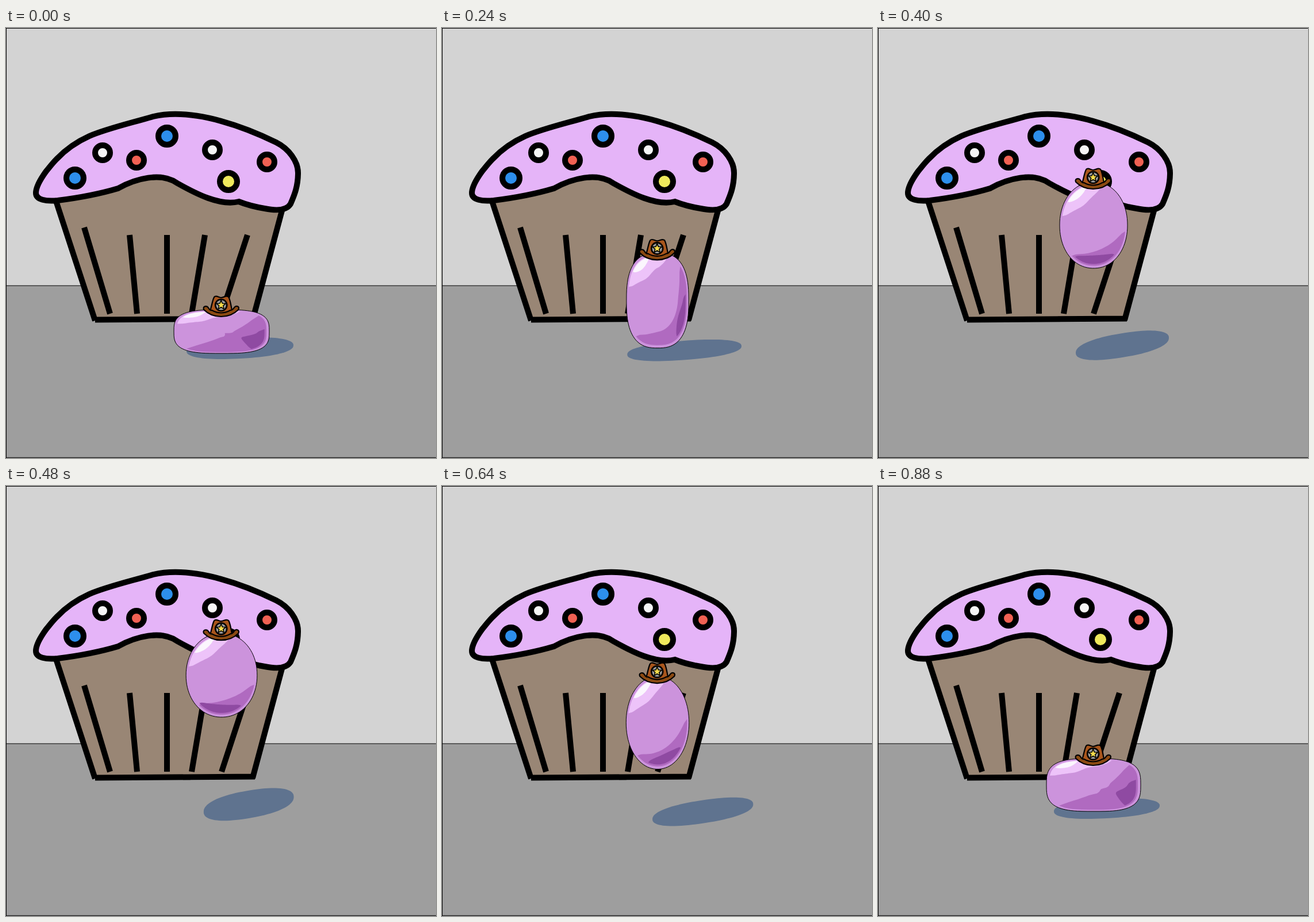
These frames come from a looping animation (748x748 px, 0.96 s). An HTML page:

```html
<!DOCTYPE html>
<html>
<head>
<meta charset="utf-8">
<title>Bouncing jelly bean</title>
<style>
html, body { margin: 0; height: 100%; overflow: hidden; }
svg { display: block; width: 100%; height: 100%; }
</style>
</head>
<body>
<svg viewBox="0 0 748 748">
  <rect width="748" height="748" fill="#d3d3d3"/>
  <rect y="448" width="748" height="300" fill="#9e9e9e"/>
  <path d="M0 .5H748M.5 0V748M0 448.2H748M0 747.3H748" stroke="#000" fill="none"/>

  <g stroke="#000" stroke-width="10" fill="none">
    <path fill="#998675" stroke="none" d="M87 290L156 507L430 505L484 300L300 240Z"/>
    <path d="M86 298L155 509M155 507.5L433 505.5M429 508L480.5 316"/>
    <path d="M136 347L181 497M215 360L228 497M280 360V497M346 360L323 497M420 360L375 497"/>
    <path fill="#e5b4f8" d="M52 287C52 275 62 260 70 249C75 243 81 235 88 228C106 209 125 197 145 188C175 175 215 166 256 154C330 137 425 177 470 199C492 210 508 232 508 252C508 275 502 290 495 306C488 318 470 318 450 314C432 311 415 306 405 302C372 310 330 288 298 270C270 250 225 262 195 279C165 288 130 295 90 300C70 302 52 299 52 287Z"/>
    <g id="sprinkles"></g>
  </g>

  <path id="shadow" fill="#5f738f"/>
  <path id="body" fill="#cc93dc" stroke="#000"/>
  <path id="shade" fill="#b06ac0"/>
  <path id="dark" fill="#8f4aa2"/>
  <path id="light" fill="#edc3f9"/>
  <path id="shine" fill="#fbf6fd"/>

  <g id="hat" stroke="#000" stroke-width="2.2" stroke-linejoin="round">
    <path fill="#a9561c" d="M-19 10C-16 0 -15 -9 -12 -14C-9 -18 -4 -13 0 -13C5 -13 9 -18 13 -14C16 -9 17 0 19 10Q0 19 -19 10Z"/>
    <path fill="#8b4a12" d="M-30 8C-33 2 -25 0 -22 5Q-19 10 -16 9Q0 18 16 9Q20 9 23 4C26 0 33 2 30 8C22 16 12 20 0 20C-12 20 -22 16 -30 8Z"/>
    <circle r="10" fill="#999" stroke-width="2.6"/>
    <path id="star" fill="#f8dc4c" stroke-width="1.6"/>
  </g>
</svg>
<script>
const STEP = 80, STEPS = 12, CENTER = 375, GROUND = 566;
const $ = id => document.getElementById(id);
const draw = (id, points) => $(id).setAttribute('d', 'M' + points.join('L') + 'Z');
const range = (n, f) => Array.from({ length: n }, (_, i) => f(i));

// step, half width, top, bottom, squareness, angle of the shade's tip, shadow x, half width, y, half height
const KEYS = [
  [0, 83, 490, 566, 3.2, -42, 407, 93, 557, 18],
  [2, 64, 448, 566, 2.4, -38, 410, 86, 564, 21],
  [4, 48, 332, 533, 2.9, -45, 432, 110, 556, 13],
  [5, 59, 268, 418, 2.1, 8, 425, 81, 552, 21],
  [7, 62, 269, 419, 2.15, 8, 426, 81, 558, 25],
  [9, 51, 402, 566, 2.1, -20, 472, 94, 573, 15],
  [11, 82, 474, 566, 3.2, -45, 398, 92, 561, 17]
];

// Smooth cyclic interpolation through the key poses.
function poseAt(step) {
  const n = KEYS.length;
  const i = KEYS.findLastIndex(key => key[0] <= step);
  const [p, a, b, q] = [i - 1, i, i + 1, i + 2].map(k => KEYS[(k + n) % n]);
  const u = (step - a[0]) / ((b[0] || STEPS) - a[0]);
  return a.slice(1).map((x, k) => {
    const [before, next, after] = [p, b, q].map(key => key[k + 1]);
    const bend = 2 * before - 5 * x + 4 * next - after;
    return x + u / 2 * (next - before + u * (bend + u * (3 * (x - next) + after - before)));
  });
}

// Point on a superellipse of unit size; 0 degrees is right, 90 is down.
function rim(degrees, power, radius = 1) {
  const a = degrees * Math.PI / 180;
  return [Math.cos(a), Math.sin(a)].map(c => radius * Math.sign(c) * Math.abs(c) ** (2 / power));
}

const oval = power => range(90, i => rim(i * 4, power));

// Crescent hugging the rim between two angles, thickest in the middle.
function crescent(from, to, depth, power, radius = .94) {
  const side = thickness => range(31, i => {
    const u = i / 30;
    const taper = Math.max(0, Math.sin(Math.PI * u)) ** .6;
    return rim(from + (to - from) * u, power, radius - thickness * taper);
  });
  return [...side(0), ...side(depth).reverse()];
}

function show(step) {
  const [w, top, rawBottom, power, tip, sx, sw, sy, sh] = poseAt(step);
  const bottom = Math.min(rawBottom, GROUND);
  const h = (bottom - top) / 2;
  const squash = Math.min(1, Math.max(0, w / h - 1));
  const place = ([x, y]) => [CENTER + w * x, top + h + h * y];
  const paint = (id, points) => draw(id, points.map(place));

  const tilt = 5 + Math.min(8, (GROUND - bottom) / 4);
  draw('shadow', oval(2.3).map(([x, y]) => [sx + sw * x, sy + sh * y - tilt * x]));
  paint('body', oval(power));
  paint('shade', crescent(tip, 132, .35 + .5 * squash, power));
  paint('dark', crescent(tip + 40, 115 + 1.4 * tip, .2 + .25 * squash, power, .9));
  paint('light', crescent(192, 284, .4, power));
  paint('shine', crescent(215, 258, .16, power, .92));
  $('hat').setAttribute('transform', `translate(${CENTER - .8} ${top - 8})`);
}

const BLUE = '#2d8fec', RED = '#f16153', YELLOW = '#eee95c', WHITE = '#f5f5f5';
const sprinkles = [
  [120, 261, 15, BLUE], [280, 188, 15, BLUE], [387, 267, 15, YELLOW],
  [168, 217, 13, WHITE], [359, 212, 13, WHITE],
  [227, 230, 13, RED], [454, 233, 13, RED]
];
$('sprinkles').innerHTML = sprinkles.map(([x, y, r, fill]) =>
  `<circle cx="${x}" cy="${y}" r="${r}" fill="${fill}"/>`).join('');

draw('star', range(10, i => rim(i * 36 - 90, 2, i % 2 ? 3.7 : 8.5)));

function tick() {
  show(Math.floor(performance.now() / STEP) % STEPS);
  requestAnimationFrame(tick);
}
tick();
</script>
</body>
</html>
```
